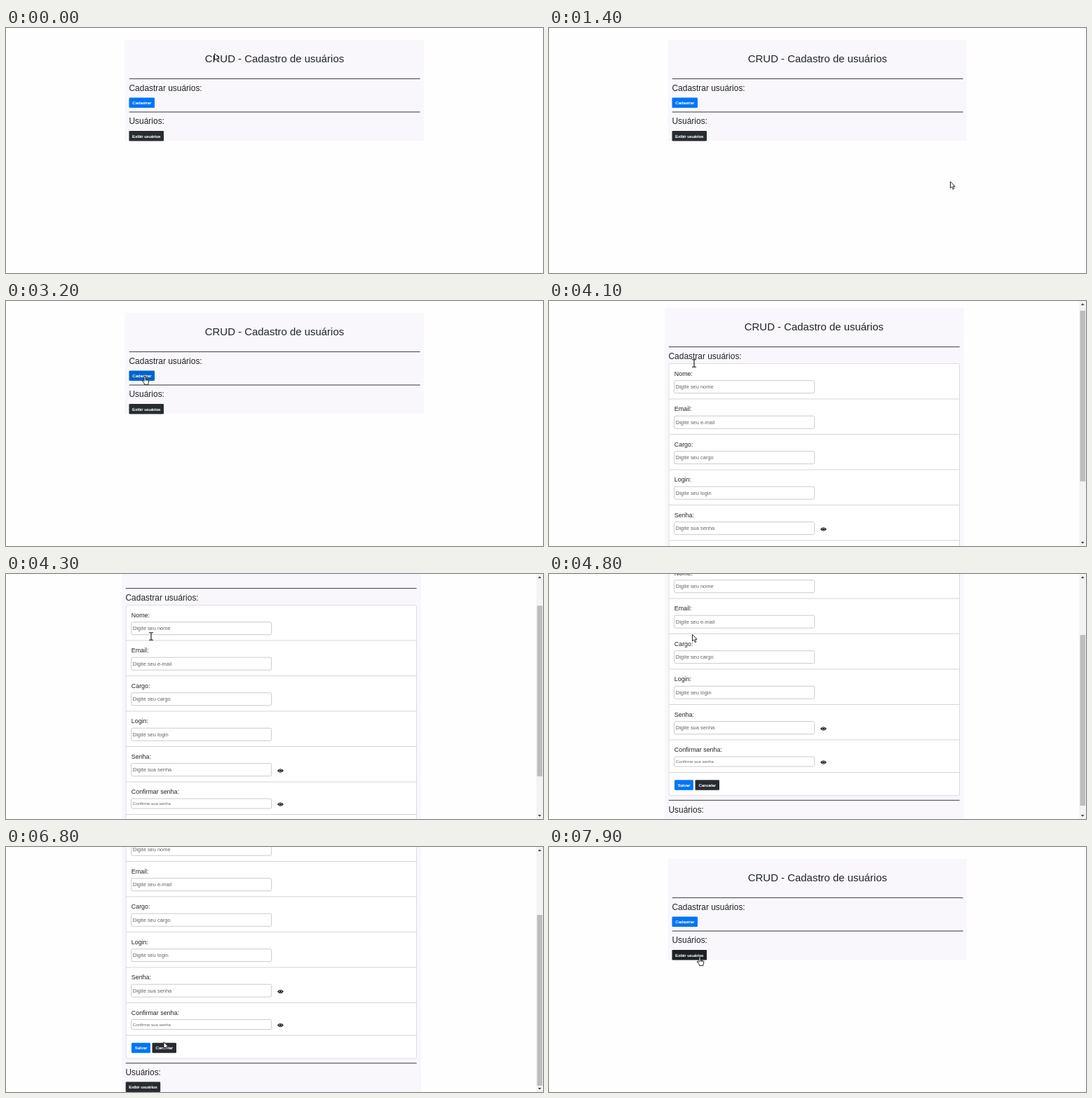
An HTML page that plays this animation: 766 by 350 pixels, repeating every 8000 ms.

```html
<!DOCTYPE html>
<html lang="pt-BR">
<head>
<meta charset="utf-8">
<title>Cadastro de usuários</title>
<style>
html, body { margin: 0; width: 100%; height: 100%; overflow: hidden; background: #fefefe; }
svg { display: block; width: 766px; height: 350px; font-family: "Liberation Sans", Arial, sans-serif; }
</style>
</head>
<body>
<svg id="stage" viewBox="0 0 766 350"></svg>
<script>
const LOOP = 8000, STEP = 100;
const OPEN_AT = 3300, CLOSE_AT = 7300;
const VIEW = 350, MAX_SCROLL = 126.5;
const stage = document.getElementById('stage');

const rect = (x, y, w, h, fill, extra = '') =>
  `<rect x="${x}" y="${y}" width="${w}" height="${h}" fill="${fill}" ${extra}/>`;

const text = (x, y, size, str, fill = '#212529', extra = '') =>
  `<text x="${x}" y="${y}" font-size="${size}" fill="${fill}" ${extra}>${str}</text>`;

const rule = (x, y) => rect(x, y, 415, 1.2, '#58585c');
const heading = (x, y, str) => text(x, y, 11.95, str);

// Buttons keep a page rectangle so the pointer can hover them
const buttons = {
  closed: [
    { x: 175.5, y: 99.5, w: 36.5, label: 'Cadastrar', blue: true },
    { x: 175.5, y: 147, w: 49.5, label: 'Exibir usuários' }
  ],
  open: [
    { x: 179, y: 406.3, w: 27, label: 'Salvar', blue: true },
    { x: 208.5, y: 406.3, w: 34.5, label: 'Cancelar' },
    { x: 170.7, y: 462, w: 49.5, label: 'Exibir usuários' }
  ]
};
const BUTTON_H = 14.5;

function button(b, hover) {
  const fill = b.blue ? (hover ? '#0062cc' : '#0075f5') : (hover ? '#1d2124' : '#282c31');
  return rect(b.x, b.y, b.w, BUTTON_H, fill, 'rx="1.3"') +
    text(b.x + b.w / 2, b.y + 9.5, 6.15, b.label, '#fff',
      'text-anchor="middle" stroke="#fff" stroke-width=".2"');
}

function eye(y) {
  return `<g transform="translate(391.5 ${y})">
    <path d="M-4.5 0Q0-5.6 4.5 0Q0 5.6-4.5 0Z" fill="#111"/>
    <circle r="2.1" fill="#fff"/><circle r="1.5" fill="#111"/></g>`;
}

function field(i, label, hint, small) {
  const y = 96.5 + i * 50.5, h = small ? 14 : 18;
  const top = y + (small ? 24 : 24.2);
  const size = small ? 6.05 : 7.45;
  return text(178.8, y + 17.4, 8.9, label) +
    rect(178.7, top, 200, h, '#fff', 'rx="2" stroke="#c3c6ca" stroke-width=".9"') +
    text(180.8, top + h / 2 + size * 0.34, size, hint, '#62666b') +
    (i > 3 ? eye(y + (i > 4 ? 32 : 234.5 - 200)) : '') +
    rect(171, y + (small ? 46.5 : 50.5) - 0.5, 414.5, 1, '#d6d6d8');
}

function header(dx) {
  return text(383 + dx, 49.4, 14.95, 'CRUD - Cadastro de usuários', '#212529', 'text-anchor="middle"') +
    rule(175.7 + dx, 71.9) + heading(175.5 + dx, 89.7, 'Cadastrar usuários:');
}

const closedPage = rect(169.5, 17, 426.5, 144, '#f9f7fc') + header(0) +
  rule(175.7, 119.4) + heading(175.5, 137.2, 'Usuários:');

const openPage = rect(165, 17, 427, 460, '#f9f7fc') + header(-5) +
  rect(171, 96.5, 414.5, 332, '#fff', 'rx="2" stroke="#dcdce0" stroke-width="1"') +
  [['Nome:', 'Digite seu nome'], ['Email:', 'Digite seu e-mail'],
   ['Cargo:', 'Digite seu cargo'], ['Login:', 'Digite seu login'],
   ['Senha:', 'Digite sua senha'], ['Confirmar senha:', 'Confirme sua senha', true]]
    .map((f, i) => field(i, ...f)).join('') +
  rule(170.7, 434.7) + heading(170.5, 452.7, 'Usuários:');

function scrollbar(scroll) {
  const track = VIEW - 18, thumb = track * VIEW / (VIEW + MAX_SCROLL);
  const y = 9 + (track - thumb) * scroll / MAX_SCROLL;
  return rect(756.5, 0, 9.5, VIEW, '#f3f3f3') +
    rect(757.5, y, 7.5, thumb, '#bdbdbd') +
    '<path d="M758.8 6L761.2 3.2L763.6 6ZM758.8 344L761.2 346.8L763.6 344Z" fill="#444"/>';
}

const pointers = {
  arrow: '<path d="M0 0V9.4L2.2 7.4L3.8 11L5.4 10.3L3.8 6.8H6.6Z" fill="#fff" stroke="#111" stroke-width=".9" stroke-linejoin="round"/>',
  beam: '<path d="M-3-5.3H-.8L0-4.6L.8-5.3H3M0-4.6V4.6M-3 5.3H-.8L0 4.6L.8 5.3H3" fill="none" stroke="#111" stroke-width="1.1"/>',
  hand: '<path d="M-1 1Q0-.8 1 1V5L5.2 5.9Q6 6.2 5.8 8L5 10.6V12.4H-.6V11L-3.8 7Q-3.6 5.6-2.4 6.3L-1 7.6Z" fill="#fff" stroke="#111" stroke-width=".9" stroke-linejoin="round"/><path d="M1 5V7M2.6 5.4V7.2M4.2 5.8V7.4" stroke="#111" stroke-width=".6"/>'
};

// time, x, y, pointer from then on
const moves = [
  [0, 297.5, 36.5, 'arrow'], [300, 188, 85, 'beam'], [400, 260, 95, 'arrow'],
  [600, 572, 128, 'arrow'], [900, 188, 137, 'beam'], [1000, 330, 140, 'arrow'],
  [1200, 727.5, 176, 'arrow'], [1300, 727.5, 176, 'arrow'], [1400, 572.5, 219.5, 'arrow'],
  [1600, 572.5, 219.5, 'arrow'], [2000, 460, 48, 'beam'], [2300, 300, 48, 'beam'],
  [2500, 226, 84, 'beam'], [2900, 198, 107, 'arrow'], [3400, 198, 107, 'arrow'],
  [3600, 207, 89, 'beam'], [4700, 207, 89, 'beam'], [4800, 204.5, 86.5, 'arrow'],
  [5000, 204.5, 86.5, 'arrow'], [5400, 210.5, 111, 'beam'], [5600, 212, 156, 'beam'],
  [5900, 270, 205, 'beam'], [6100, 378, 222, 'arrow'], [6200, 300, 309, 'arrow'],
  [6400, 192, 288, 'arrow'], [6500, 222, 255, 'beam'], [6600, 224, 270, 'arrow'],
  [7000, 226, 287, 'arrow'], [7300, 226, 287, 'arrow'], [7800, 215, 157, 'arrow']
];
const scrolls = [
  [4000, 0], [4100, 7], [4300, 52], [4600, 108], [4700, 108],
  [4800, 112], [5000, MAX_SCROLL]
];

function sample(keys, t) {
  let i = 0;
  while (i < keys.length - 1 && keys[i + 1][0] <= t) i++;
  const a = keys[i], b = keys[i + 1] || a;
  const k = b === a ? 0 : Math.max(0, (t - a[0]) / (b[0] - a[0]));
  return a.map((v, n) => typeof v === 'number' ? v + (b[n] - v) * k : v);
}

function draw(t) {
  const open = t >= OPEN_AT && t < CLOSE_AT;
  const scroll = open ? sample(scrolls, t)[1] : 0;
  const [, x, y, kind] = sample(moves, t);
  const over = b => x >= b.x && x <= b.x + b.w &&
    y + scroll >= b.y && y + scroll <= b.y + BUTTON_H;
  const list = buttons[open ? 'open' : 'closed'];
  const pointer = pointers[list.some(over) ? 'hand' : kind];
  stage.innerHTML = rect(0, 0, 766, VIEW, '#fefefe') +
    `<g transform="translate(0 ${-scroll})">${open ? openPage : closedPage}` +
    list.map(b => button(b, over(b))).join('') + '</g>' +
    (open ? scrollbar(scroll) : '') +
    `<g transform="translate(${x} ${y})">${pointer}</g>`;
}

const start = performance.now();
let last = -1;
function tick() {
  const t = Math.floor((performance.now() - start) % LOOP / STEP) * STEP;
  if (t !== last) draw(last = t);
  requestAnimationFrame(tick);
}
tick();
</script>
</body>
</html>
```
